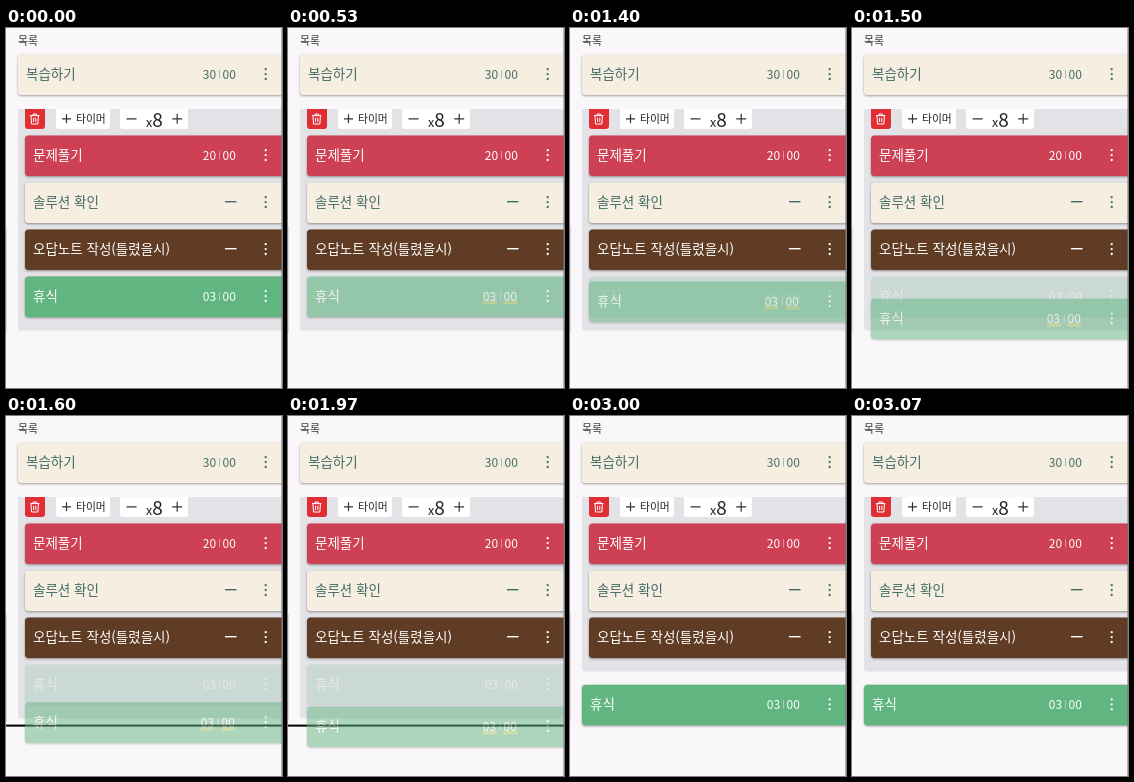
An HTML page that plays this animation: 276 by 360 pixels, repeating every 3.31 s.

```html
<!DOCTYPE html>
<html lang="ko">
<head>
<meta charset="utf-8">
<title>목록</title>
<style>
  html, body { margin: 0; width: 100%; height: 100%; overflow: hidden; background: #faf7fa; }
  svg { display: block; width: 276px; height: 360px; font-family: "Noto Sans CJK KR", "Noto Sans CJK", sans-serif; }
  .title { font-size: 13.5px; font-weight: 500; }
  .time { font-size: 12px; }
  .box { filter: drop-shadow(0 1px 1px rgba(0, 0, 0, .38)); }
</style>
</head>
<body>
<svg id="stage" viewBox="0 0 276 360"></svg>
<script>
const LOOP = 3310, GRAB = 530, DROP = 2030, REST_Y = 248.5;
const CREAM = '#f6eee0', TEAL = '#426b66', GREEN = '#60b580', WHITE = '#fff';

// Vertical drag: [time, offset, speed]
const path = [[1270, 0, 0], [1400, 5, .09], [1600, 38, .07], [1770, 42, 0]];

const line = (d, color, width = 1.2) =>
  `<path d="${d}" fill="none" stroke="${color}" stroke-width="${width}"/>`;

function timeLabel(time, ink, held) {
  if (!time) return line('M219 19.2h11.5', ink, 1.4);
  const [min, sec] = time.split(':');
  const [a, b, bar] = held ? [194.7, 215.5, 212.3] : [196.8, 216.6, 213.5];
  const under = held
    ? line(`M${a} 25.4h14M${b} 25.4h14M${a} 27.2h14M${b} 27.2h14`, '#f6d743', .8)
    : '';
  return `<g class="time" fill="${ink}"><text x="${a}" y="24">${min}</text>
    <text x="${b}" y="24">${sec}</text></g>
    <path d="M${bar} 15.5v8.5" stroke="${ink}" stroke-width=".8" opacity=".5"/>${under}`;
}

function card(x, title, time, fill, ink, held = false) {
  const dots = [14.7, 19.6, 24.5].map(y => `<circle cx="259.7" cy="${y}" r="1.15"/>`).join('');
  return `<rect class="box" x="${x}" width="270" height="40.5" rx="3.5" fill="${fill}"/>
    <text class="title" x="${x + 8}" y="24.6" fill="${ink}">${title}</text>
    ${timeLabel(time, ink, held)}<g fill="${ink}">${dots}</g>`;
}

const at = (y, content, id = '') =>
  `<g ${id && `id="${id}"`} transform="translate(0 ${y})">${content}</g>`;

const button = (x, w, fill) =>
  `<path d="M${x} 81h${w}v17q0 3-3 3h-${w - 6}q-3 0-3-3z" fill="${fill}"/>`;

const toolbar = button(19, 20, '#e02e35') + button(50, 54, WHITE) + button(114, 68, WHITE) +
  line('M24 87.6h9.4M27 87.4v-1.4h3.4v1.4M25 87.8l.5 8.2h6.4l.5-8.2M27.6 89.8v4.2M29.8 89.8v4.2', WHITE, 1) +
  line('M56 90.8h9M60.5 86.3v9M120.5 90.8h10M166.2 90.8h10M171.2 85.8v10', '#333') +
  `<g fill="#222"><text x="70" y="94.6" font-size="10.8">타이머</text>
   <text x="140" y="98.6" font-size="12.5">x</text>
   <text x="146.2" y="98.6" font-size="19">8</text></g>`;

const rest = x => card(x, '휴식', '03:00', GREEN, WHITE);

document.getElementById('stage').innerHTML =
  `<rect width="276" height="360" fill="#faf7fa"/>
   <path d="M.5 198v107" stroke="#dcdadd"/>
   <text x="12" y="17.2" font-size="10.8" fill="#333">목록</text>` +
  at(26.5, card(12, '복습하기', '30:00', CREAM, TEAL)) +
  `<path id="group" fill="#e3e2e6"/>` + toolbar +
  at(107.5, card(19, '문제풀기', '20:00', '#ce4053', WHITE)) +
  at(154.5, card(19, '솔루션 확인', '', CREAM, TEAL)) +
  at(201.5, card(19, '오답노트 작성(틀렸을시)', '', '#603c24', WHITE)) +
  at(REST_Y, rest(19), 'inside') +
  at(268.7, rest(12), 'outside') +
  `<rect id="marker" y="308.6" width="276" height="2" fill="#000"/>` +
  at(REST_Y, card(19, '휴식', '03:00', GREEN, WHITE, true), 'held') +
  `<path d="M275.5 0v360" stroke="#77757a" opacity=".5"/>`;

const [group, inside, outside, marker, held] =
  ['group', 'inside', 'outside', 'marker', 'held'].map(id => document.getElementById(id));
held.setAttribute('opacity', .5);

function dragOffset(t) {
  if (t <= path[0][0]) return 0;
  for (let i = 1; i < path.length; i++) {
    const [t0, y0, v0] = path[i - 1], [t1, y1, v1] = path[i];
    if (t > t1) continue;
    const d = t1 - t0, u = (t - t0) / d, w = 1 - u;
    return w * w * (1 + 2 * u) * y0 + u * u * (3 - 2 * u) * y1 + d * u * w * (w * v0 - u * v1);
  }
  return path[path.length - 1][1];
}

const show = (el, on) => el.setAttribute('visibility', on ? 'visible' : 'hidden');

function render(t) {
  const dragging = t >= GRAB && t < DROP, dropped = t >= DROP;
  const offset = dragOffset(t);
  group.setAttribute('d', `M12 81H280V${dropped ? 255.5 : 302.5}H15.5q-3.5 0-3.5-3.5z`);
  show(inside, !dropped);
  inside.setAttribute('opacity', dragging ? .18 : 1);
  show(outside, dropped);
  show(held, dragging);
  held.setAttribute('transform', `translate(0 ${REST_Y + offset})`);
  show(marker, dragging && offset > 32);
}

const start = performance.now();
function tick() {
  render((performance.now() - start) % LOOP);
  requestAnimationFrame(tick);
}
tick();
</script>
</body>
</html>
```
